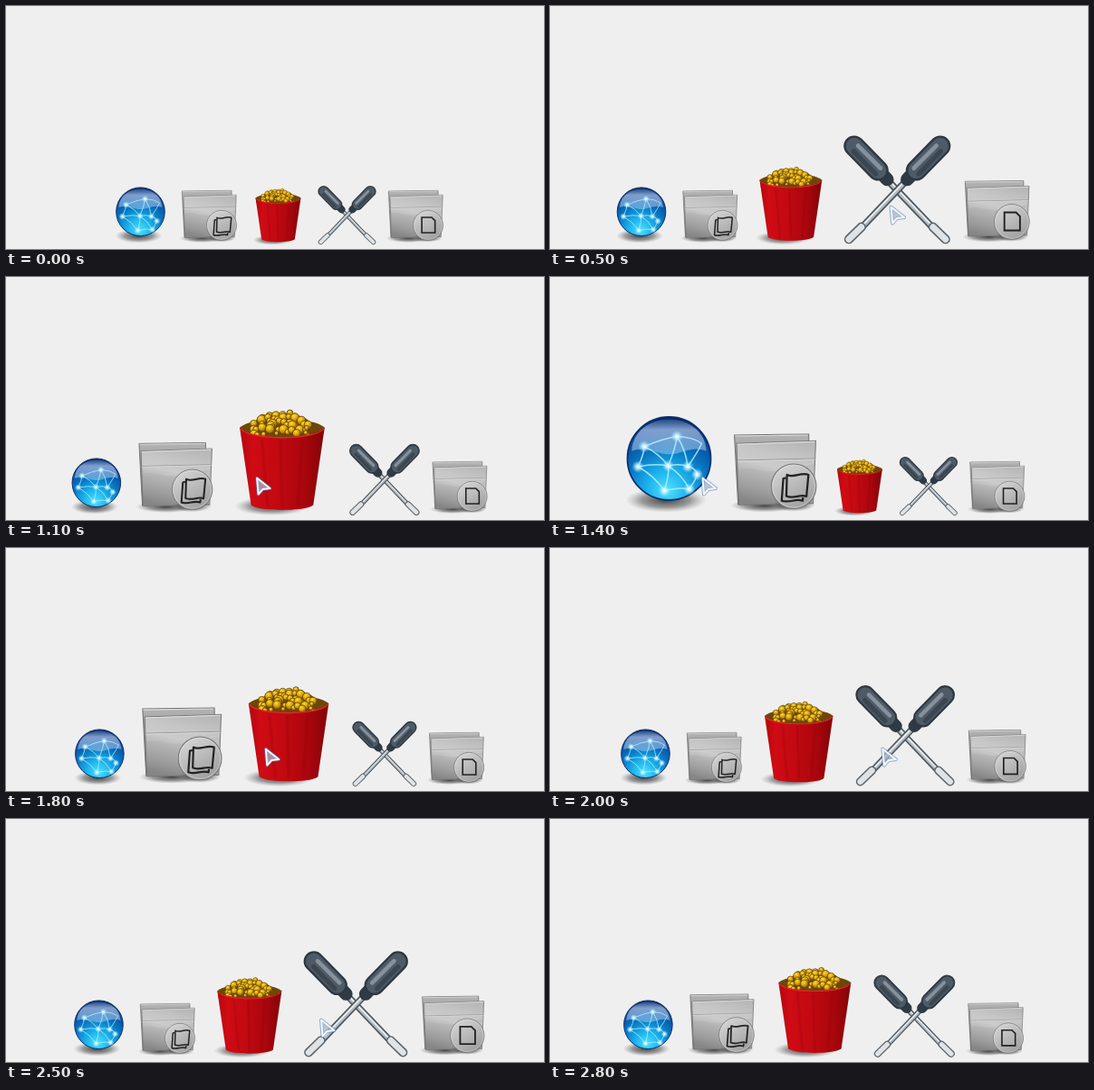
Recreate the animation shown at these times as an HTML page. Size 594 by 269 pixels, loop 3.2 s.

```html
<!DOCTYPE html>
<html lang="en">
<head>
<meta charset="utf-8">
<title>Magnifying dock</title>
<style>
  html, body { margin: 0; width: 100%; height: 100%; overflow: hidden; background: #efefef; }
  svg { display: block; width: 594px; height: 269px; }
</style>
</head>
<body>
<svg id="stage" viewBox="0 0 594 269">
  <defs>
    <radialGradient id="shade">
      <stop offset="0" stop-color="#222" stop-opacity=".85"/>
      <stop offset=".6" stop-color="#444" stop-opacity=".5"/>
      <stop offset="1" stop-color="#777" stop-opacity="0"/>
    </radialGradient>
    <radialGradient id="sea" cx=".48" cy=".88" r=".88">
      <stop offset="0" stop-color="#4fe0ff"/>
      <stop offset=".28" stop-color="#1cb2ec"/>
      <stop offset=".55" stop-color="#0878c4"/>
      <stop offset=".8" stop-color="#0a4c9c"/>
      <stop offset="1" stop-color="#06245e"/>
    </radialGradient>
    <linearGradient id="gloss" x2="0" y2="1">
      <stop offset="0" stop-color="#8fa8d8" stop-opacity=".25"/>
      <stop offset=".3" stop-color="#b3c4e6" stop-opacity=".7"/>
      <stop offset="1" stop-color="#a4cdf0" stop-opacity=".5"/>
    </linearGradient>
    <radialGradient id="spark">
      <stop offset="0" stop-color="#fff"/>
      <stop offset=".35" stop-color="#d8f8ff" stop-opacity=".8"/>
      <stop offset="1" stop-color="#7fe4ff" stop-opacity="0"/>
    </radialGradient>
    <linearGradient id="back" x2="0" y2="1">
      <stop offset="0" stop-color="#b4b4b4"/>
      <stop offset="1" stop-color="#666"/>
    </linearGradient>
    <linearGradient id="front" x1=".65" y1="0" x2=".35" y2="1">
      <stop offset="0" stop-color="#b8b8b8"/>
      <stop offset=".25" stop-color="#c6c6c6"/>
      <stop offset=".42" stop-color="#cbcbcb"/>
      <stop offset=".65" stop-color="#b0b0b0"/>
      <stop offset="1" stop-color="#868686"/>
    </linearGradient>
    <linearGradient id="disc" x1=".2" x2=".8" y2="1">
      <stop offset="0" stop-color="#d6d6d6"/>
      <stop offset=".5" stop-color="#b9b9b9"/>
      <stop offset="1" stop-color="#9c9c9c"/>
    </linearGradient>
    <linearGradient id="red">
      <stop offset="0" stop-color="#b4060d"/>
      <stop offset=".15" stop-color="#d00b14"/>
      <stop offset=".45" stop-color="#c20911"/>
      <stop offset=".75" stop-color="#aa060d"/>
      <stop offset="1" stop-color="#820408"/>
    </linearGradient>
    <radialGradient id="corn" cx=".4" cy=".3" r=".75">
      <stop offset="0" stop-color="#fbdc30"/>
      <stop offset=".45" stop-color="#dba80e"/>
      <stop offset="1" stop-color="#7c5208"/>
    </radialGradient>

    <g id="globe">
      <ellipse cx="30" cy="53.5" rx="26" ry="8" fill="url(#shade)"/>
      <circle cx="32" cy="26.700" r="26.800" fill="url(#sea)" stroke="#0a2f70" stroke-width="1"/>
      <path d="M8 22C8.500 9 20 1.500 32 1.500S55.500 9 56 22C47 18 40 24 32 24S17 18 8 22Z" fill="url(#gloss)"/>
      <g id="net" fill="none" stroke="#b4efff" stroke-width=".9" stroke-opacity=".85"/>
    </g>

    <g id="folder">
      <ellipse cx="24" cy="56" rx="25" ry="5" fill="url(#shade)"/>
      <path d="M1.800 4 56.500 3.300 57.500 54 4.500 55Z" fill="url(#back)" stroke="#707070" stroke-width=".7"/>
      <path d="M2.200 4.700 56 4" stroke="#ddd" stroke-width=".7"/>
      <path d="M3.400 10.200 61.700 8.200 59.800 54.500 5 55.500Z" fill="url(#front)" stroke="#787878" stroke-width=".7"/>
      <path d="M4.200 29C15 26 24 34 37 29S52 29 60.700 25L60.200 40C44 34 26 48 4.700 43Z" fill="#999" fill-opacity=".22"/>
      <path d="M3.900 10.800 61 8.900" stroke="#e2e2e2" stroke-width=".7"/>
      <path d="M4 22.700 61 21.400" stroke="#8a8a8a" stroke-width=".6"/>
      <path d="M4 23.300 61 22" stroke="#dedede" stroke-width=".6"/>
      <ellipse cx="45" cy="55.500" rx="16.500" ry="5" fill="url(#shade)"/>
      <circle cx="45.500" cy="41.800" r="16.500" fill="url(#disc)" stroke="#757575" stroke-width=".7"/>
      <circle cx="45.500" cy="41.800" r="15.600" fill="none" stroke="#e4e4e4" stroke-opacity=".6" stroke-width=".6"/>
    </g>

    <g id="maps">
      <use href="#folder"/>
      <g fill="none" stroke="#222" stroke-width="1.500" stroke-linejoin="round">
        <path d="M40.500 33.300C45.500 36 50.500 31.200 56.300 33.300L54.800 49.300C50 47.300 45.500 51.500 40 49Z"/>
        <path d="M39.800 35.600 37.800 36 36.600 52.500C42 54.500 47 50.500 52 52.500L52.300 50"/>
      </g>
    </g>

    <g id="papers">
      <use href="#folder"/>
      <path d="M38.600 33H49.500L53.200 36.700V50H38.600Z" fill="none" stroke="#222" stroke-width="1.600"/>
    </g>

    <g id="popcorn">
      <ellipse cx="26" cy="58" rx="22" ry="5.500" fill="url(#shade)"/>
      <path d="M7 11.500Q10 9 16 8C20 2 44 2 48 8Q54 9 57 11.500L55 18H9Z" fill="#6e4608"/>
      <g id="heap" fill="url(#corn)" stroke="#674207" stroke-width=".45"/>
      <path d="M7 11.500C12 19 52 19 57 11.500L50.300 57.300C46 61.200 18 61.200 13.700 57.300Z" fill="url(#red)"/>
      <path d="M7.200 12C12 19.300 52 19.300 56.800 12" fill="none" stroke="#e02a2c" stroke-width=".7"/>
      <path d="M20 18.500 23.500 58M31 19 32 58.500M44 18.500 41 58" stroke="#8c040a" stroke-opacity=".25" stroke-width="1.800"/>
    </g>

    <g id="driver" stroke-linecap="round">
      <path d="M25 23.500 54 54" stroke="#4c555d" stroke-width="4.200"/>
      <path d="M25 23.500 54 54" stroke="#b4bbc1" stroke-width="2.400"/>
      <path d="M25.500 23.300 54 53.300" stroke="#f2f4f5" stroke-width=".8"/>
      <path d="M53.500 53 61 60.300" stroke="#5d666d" stroke-width="5.600"/>
      <path d="M53.500 53 61 60.300" stroke="#dfe3e6" stroke-width="3.800"/>
      <path d="M20 18 26 24.300" stroke="#303a44" stroke-width="8"/>
      <path d="M6.200 4.200 20.500 18.800" stroke="#2e3842" stroke-width="12.600"/>
      <path d="M6.200 4.200 20.500 18.800" stroke="#4e5b67" stroke-width="10"/>
      <path d="M8.500 4 22 17.500" stroke="#85929e" stroke-width="2.600"/>
      <path d="M6 7.500 19 21" stroke="#3a4650" stroke-width="3"/>
    </g>
    <g id="tools">
      <use href="#driver"/>
      <use href="#driver" transform="matrix(-1 0 0 1 64 0)"/>
    </g>
  </defs>
  <g id="dock"></g>
  <g id="cursor" stroke-linejoin="round">
    <path d="M.5 .5 2 18.500 7 13 15 12Z" fill="none" stroke="#3f74b4" stroke-opacity=".55" stroke-width="4"/>
    <path d="M.5 .5 2 18.500 7 13 15 12Z" fill="#a9b6c6" fill-opacity=".75" stroke="#f3f8ff" stroke-width="2"/>
  </g>
</svg>
<script>
const $ = id => document.getElementById(id);
const add = (parent, tag, attrs) => {
  const el = document.createElementNS("http://www.w3.org/2000/svg", tag);
  for (const key in attrs) el.setAttribute(key, attrs[key]);
  return parent.appendChild(el);
};

// Glowing network on the globe
const nodes = [[16, 19], [37, 12.5], [31.4, 31.5], [44, 32], [50, 37], [29, 47.5], [12, 32], [45, 46.5], [53, 17]];
const links = [[0, 1], [0, 2], [1, 2], [1, 3], [2, 3], [3, 4], [2, 5], [2, 6], [0, 6], [5, 6], [5, 7], [4, 7], [3, 8], [2, 7], [1, 8]];
for (const [a, b] of links) {
  const [x, y] = nodes[a], [u, v] = nodes[b];
  add($("net"), "path", { d: `M${x} ${y}Q${(x + u) / 2 + 2} ${(y + v) / 2 - 2} ${u} ${v}` });
}
for (const [cx, cy] of nodes.slice(0, 8))
  add($("net"), "circle", { cx, cy, r: 4, fill: "url(#spark)", stroke: "none" });

// Kernels, back row first
let seed = 7;
const rand = () => (seed = seed * 16807 % 2147483647) / 2147483647;
for (let row = 0; row < 5; row++) {
  const half = 10 + row * 2.7;
  for (let x = -half; x <= half; x += 3.4)
    add($("heap"), "circle", {
      cx: 32 + x + rand() * 3 - 1.5,
      cy: 3.6 + row * 2.5 + rand() * 3 - 1.5 + x * x / 180,
      r: 1.2 + rand() * 1.6
    });
}

const SIZE = 64, GAP = 12, PITCH = SIZE + GAP, MID = 300.5, FLOOR = 265;
const BASE = MID - 2.5 * PITCH;
const icons = ["globe", "maps", "popcorn", "tools", "papers"]
  .map(name => add($("dock"), "use", { href: "#" + name }));

// Pointer position along the resting dock, every 100 ms from START
const START = 500, END = 2800, LOOP = 3200;
const track = [365, 408, 436, 446, 410, 350, 293, 243, 200, 174, 156, 185,
  240, 281, 305, 350, 410, 465, 471, 400, 360, 325, 300];
const rest = [0, 0, 0, 0, 0];
const settling = [0, .17, .6, .4, .01];

const growth = m => rest.map((_, i) =>
  .94 * Math.max(0, 1 - Math.abs(m - BASE - (i + .5) * PITCH) / 108));

// Gaps widen a little with the icon they surround
function layout(grow) {
  const widths = grow.map(g => SIZE * (1 + g) + GAP * (1 + g / 3));
  let x = MID - widths.reduce((a, b) => a + b) / 2;
  return widths.map((w, i) => {
    const slot = { x, w };
    const s = 1 + grow[i], size = SIZE * s;
    icons[i].setAttribute("transform", `translate(${x + (w - size) / 2} ${FLOOR - size}) scale(${s})`);
    x += w;
    return slot;
  });
}

function draw(time) {
  const t = Math.floor(time % LOOP / 100) * 100;
  const moving = t >= START && t < END;
  $("cursor").style.display = moving ? "" : "none";
  if (!moving) {
    layout(t < 100 ? rest : settling);
    return;
  }
  const k = (t - START) / 100, m = track[k];
  const slots = layout(growth(m));
  const at = (m - BASE) / PITCH;
  const i = Math.max(0, Math.min(4, Math.floor(at)));
  const lead = .3 * ((track[k + 1] ?? m) - m);
  const x = slots[i].x + (at - i) * slots[i].w + lead;
  $("cursor").setAttribute("transform", `translate(${x} 222)`);
}

const begin = performance.now();
function tick() {
  draw(performance.now() - begin);
  requestAnimationFrame(tick);
}
tick();
</script>
</body>
</html>
```
